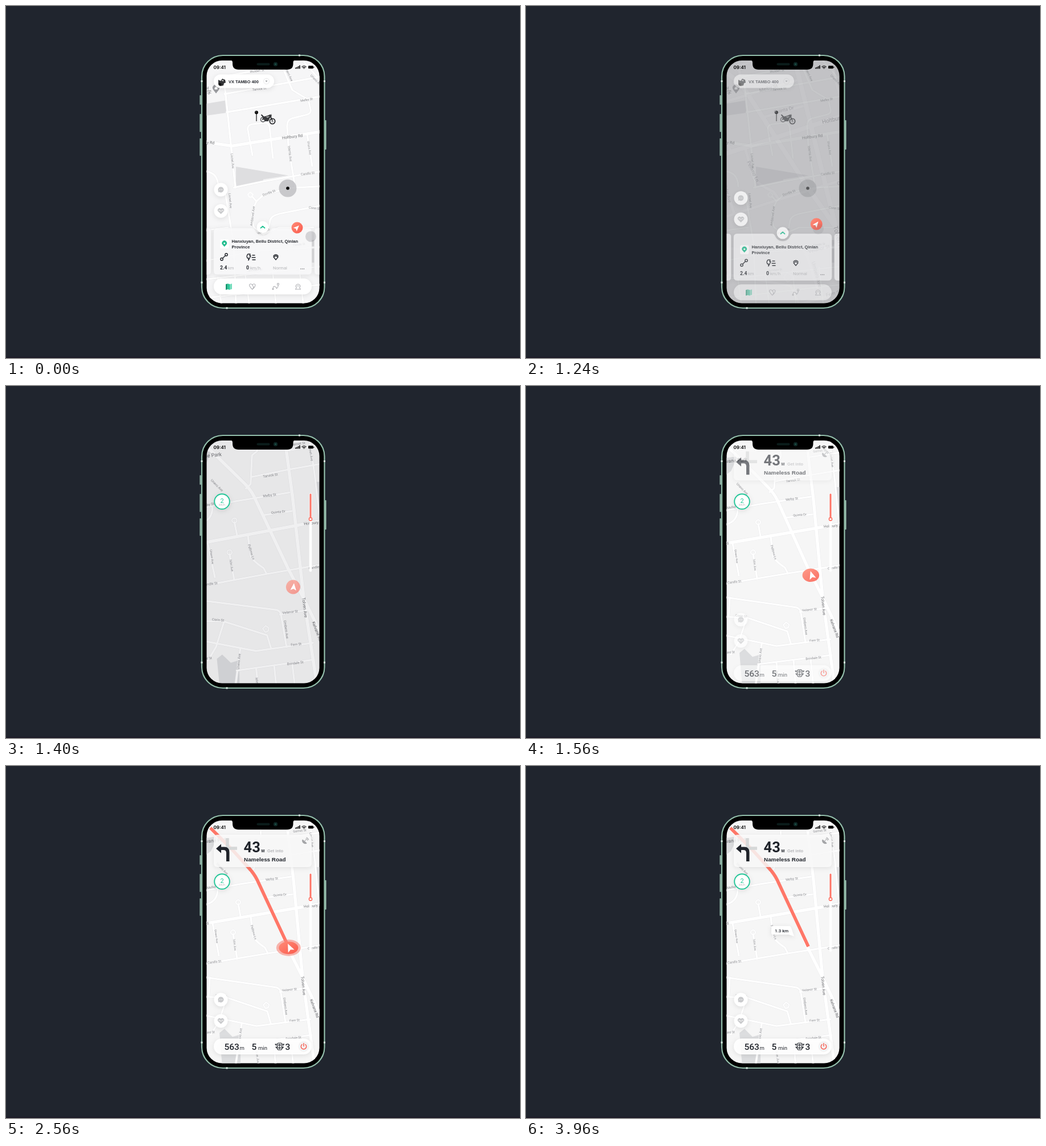
Recreate the animation shown at these times as an HTML page. Size 903 px wide and 620 px high, loop 4 s.

```html
<!DOCTYPE html>
<html lang="en">
<head>
<meta charset="utf-8">
<title>Ride navigation</title>
<style>
html, body { margin: 0; height: 100%; overflow: hidden; background: #20252e; }
svg { display: block; width: 100vw; height: 100vh; }
text { font-family: Roboto, Arial, sans-serif; }
.b { font-family: "Liberation Sans", Arial, sans-serif; font-weight: 700; }
.mid { text-anchor: middle; }
.grey { fill: #b5b6b9; }
.shade { filter: drop-shadow(0 2px 4px rgba(0,0,0,.1)); }
.line { fill: none; stroke-linecap: round; stroke-linejoin: round; }
</style>
</head>
<body>
<svg viewBox="0 0 903 620">
<defs>
  <clipPath id="screen"><rect x="352.5" y="96" width="198" height="427.5" rx="27"/></clipPath>
  <linearGradient id="red" x1="0" y1="0" x2="1" y2="1"><stop stop-color="#ff8c78"/><stop offset="1" stop-color="#fa5a4c"/></linearGradient>
  <g id="help">
    <g class="shade" fill="#fff"><circle cx="377.5" cy="323.5" r="12"/><circle cx="377.5" cy="361" r="12"/></g>
    <g fill="#c9cacc">
      <path d="M377.500 318.500a5 5 0 1 1-3 9l-2 .8.6-2.300a5 5 0 0 1 4.400-7.500z"/>
      <path d="M377.500 366.500l-5-5a3.200 3.200 0 0 1 5-4 3.200 3.200 0 0 1 5 4z"/>
    </g>
    <g fill="#fff"><circle cx="375.800" cy="323.500" r=".8"/><circle cx="379.200" cy="323.500" r=".8"/></g>
    <path class="line" d="M374 360h2l1.500 2 2-2h2" stroke="#fff"/>
  </g>
</defs>

<rect width="903" height="620" fill="#20252e"/>
<rect y="618" width="903" height="2" fill="#1c1a26"/>

<!-- phone body -->
<g class="line" stroke="#a8d3be" stroke-width="2">
  <path d="M341.500 158v15M341.500 191v30M341.500 234v29M561.500 202v50"/>
</g>
<rect x="344" y="87" width="215.500" height="445" rx="37" stroke="#93bfab" stroke-width="2.200"/>
<g fill="#dff3e9">
  <path d="M514 85.500h3v3h-3zM386.500 530.500h3v3h-3zM342.500 131h3v3h-3zM558 131h3v3h-3zM342.500 485.500h3v3h-3zM558 485.500h3v3h-3z"/>
</g>

<g clip-path="url(#screen)">
  <rect x="352" y="96" width="199" height="428" fill="#23272e"/>

  <g id="home">
    <rect x="352" y="96" width="199" height="428" fill="#f6f6f7"/>
    <path d="M352 172l36-6v22l-36 5zM404 283l92 15.500-44 7v5l-48 8zM537 412h4.500v40h-4.500z" fill="#dedee0"/>
    <g id="homeMap"></g>
    <path d="M425 332l4-4 5 4-3 5-4-1z" fill="#f6f6f7" stroke="#fff" stroke-width="1.500"/>
    <text x="345" y="147" font-size="8" fill="#77787b">ool</text>
    <text x="353" y="155" font-size="8" fill="#77787b" style="font-family:'Noto Sans CJK SC','Noto Sans CJK',sans-serif">学</text>
    <path d="M369 154l-5-6.500a6 6 0 1 1 10 0z" fill="#9b9ca0"/>
    <path d="M366.500 144l2.500-2 2.500 2v3h-5z" fill="#fff"/>
    <circle cx="495" cy="321" r="15.500" fill="#b9b9bc" opacity=".75"/>
    <circle cx="495" cy="321" r="2.800"/>
    <path d="M440 188v15" stroke="#111" stroke-width="1.200"/>
    <circle cx="440" cy="187.500" r="3"/><circle cx="439.200" cy="186.800" r=".9" fill="#777"/>
    <g class="line" stroke="#26272a" stroke-width="1.800">
      <circle cx="451.500" cy="200" r="4" stroke="#6d6e72"/><circle cx="468" cy="203" r="4.600"/>
      <path d="M449 192l4 4 6-2 7-2M464 193l4 9M453 196l-2 4"/>
    </g>
    <path d="M451 195l7-1 6-3 3 3-4 4-2 5h-6l-3-4z" fill="#37383b"/>
    <path d="M456 195l7-1-3 3zM464 191l3-1v2z" fill="#bbb"/>
    <circle cx="468" cy="203" r="1.800" fill="#8c8d90"/>
  </g>

  <g id="nav">
    <rect x="352" y="96" width="199" height="428" fill="#f6f6f6"/>
    <g id="navMap"></g>
  </g>
  <path id="route" class="line" pathLength="1" d="M496 318L441 200Q436 190 427 180L398 148L359 109" stroke="#ff7768" stroke-width="5.700" style="stroke-linecap:butt" stroke-dasharray="1 1.100"/>

  <g id="gauges">
    <path d="M535 191v134" class="line" stroke="#fff" stroke-width="4.500"/>
    <path d="M535 191v40" class="line" stroke="#ff7466" stroke-width="3"/>
    <circle cx="535" cy="234.500" r="2.600" fill="#fff" stroke="#ff7466" stroke-width="1.600"/>
    <circle class="shade" cx="379.500" cy="203.500" r="13.300" fill="#fff" stroke="#23c698" stroke-width="1.900"/>
    <text class="mid" x="379.500" y="205.500" font-size="11" fill="#23c698">2</text>
    <text class="mid grey" x="379.500" y="211" font-size="4.500">km/h</text>
  </g>

  <g id="bars">
    <g id="head">
      <rect class="shade" x="365" y="121" width="172" height="57" rx="6" fill="#fbfbfb" fill-opacity=".84"/>
      <path d="M389 127v25M389 145h17" stroke="#d6d8d8" stroke-width="5.500" fill="none"/>
      <path d="M369 145.500l9-8v5h5.500q9 0 9 9.500v16h-5.500v-15q0-5-5-5h-4v5.500z" fill="#20242b"/>
      <text x="417.500" y="152" font-size="25.500" font-weight="600" fill="#20242b">43</text>
      <text class="b" x="448.500" y="151.500" font-size="7" fill="#20242b">M</text>
      <text class="b grey" x="459" y="151.500" font-size="7.400">Get into</text>
      <text class="b" x="418" y="168" font-size="9.900" fill="#20242b">Nameless Road</text>
      <g class="line" stroke="#a3a4a7" stroke-width="1.100">
        <path d="M521 130a5 5 0 0 0 7 6z" fill="#a3a4a7"/><path d="M525 132l1.500-2M527 128a4 4 0 0 1 2.500 3M528 126a6 6 0 0 1 3.500 4"/>
      </g>
    </g>
    <use href="#help" y="88"/>
    <g id="foot" fill="#20242b">
      <rect class="shade" x="365" y="480" width="172" height="28" rx="14" fill="#fff" fill-opacity=".9"/>
      <text x="383.500" y="500" font-size="15.500" font-weight="500">563</text>
      <text x="410.500" y="500" font-size="9.500">m</text>
      <text x="431.500" y="500" font-size="15.500" font-weight="500">5</text>
      <text x="443" y="500" font-size="9.500">min</text>
      <text x="490.500" y="500" font-size="15.500" font-weight="500">3</text>
      <g class="line" stroke="#20242b" stroke-width="1.200">
        <rect x="477" y="488" width="7.500" height="12" rx="1.500"/><circle cx="480.700" cy="491.500" r="1.400"/><circle cx="480.700" cy="496.500" r="1.400"/>
        <path d="M476 490h-3l2 2M476 495h-2l2 2M485.500 490h3l-2 2M485.500 495h2l-2 2"/>
      </g>
      <circle cx="523" cy="494" r="9.500" fill="#f3f3f4"/>
      <path class="line" d="M520 490.500a4.700 4.700 0 1 0 6 0M523 488.500v5" stroke="#f8574b" stroke-width="1.400"/>
    </g>
  </g>

  <g id="pill">
    <rect class="shade" x="365" y="120.500" width="106" height="24" rx="12" fill="#fff"/>
    <path d="M373 130l4 2 3-4 5 2 1 5-3 1-1 4-5 1-4-3z" fill="#333437"/>
    <circle cx="376" cy="138" r="2.500" fill="#111"/><path d="M378 131l4-1v3z" fill="#ccc"/>
    <text class="b" x="391" y="135.500" font-size="7.400" fill="#22252b">VX TAMBO 400</text>
    <circle cx="457.500" cy="132.500" r="5" fill="#fff" stroke="#e2e2e4" stroke-width=".8"/>
    <path d="M455.500 131.500h4l-2 2.300z" fill="#88898d"/>
  </g>

  <g id="tools"><use href="#help"/></g>

  <g id="card">
    <g class="shade" fill="#fbfbfc" fill-opacity=".82" stroke="#ececee" stroke-width=".6">
      <path d="M365 397q0-6 6-6h61c5 0 5 4 8 8q4 5 11 5t11-5c3-4 3-8 8-8h61q6 0 6 6v70q0 6-6 6h-160q-6 0-6-6z"/>
      <path d="M345 391h10q5 0 5 5v72q0 5-5 5h-10zM558 391h-11q-5 0-5 5v72q0 5 5 5h11z"/>
    </g>
    <circle class="shade" cx="451" cy="389.500" r="10.500" fill="#fff"/>
    <path class="line" d="M447.500 391l3.500-3 3.500 3" stroke="#22c394" stroke-width="1.800"/>
    <rect x="376" y="411" width="15.500" height="16" rx="3" fill="#fff"/>
    <path d="M383.700 424l-3.200-3.500a4.300 4.300 0 1 1 6.400 0z" fill="#22bd8f"/><circle cx="383.700" cy="418" r="1.500" fill="#fff"/>
    <g class="b" fill="#25282e" font-size="7.550">
      <text class="b" x="396.500" y="417">Hanxiuyan, Beilu District, Qinlan</text><text class="b" x="396.500" y="426.500">Province</text>
    </g>
    <g class="line" stroke="#25282e" stroke-width="1.400">
      <circle cx="379" cy="446" r="2.200"/><circle cx="387" cy="438" r="2.200"/><path d="M381 444l4-4"/>
      <path d="M425 437h4l-1 3h2l-4 8v-4h-2q-2-4 1-7zM433 439h4M432 443h6M433 447h5M470 440q4-4 8 0M474 447l-4-5 4-2 4 2z"/>
    </g>
    <g font-size="8.600" font-weight="700" fill="#25282e"><text x="376" y="464">2.4</text><text x="422" y="464">0</text></g>
    <g class="grey" font-size="7.600"><text x="390" y="464">km</text><text x="429" y="464">km/h</text><text x="469" y="464">Normal</text></g>
    <g fill="#66676b"><circle cx="518" cy="463" r=".8"/><circle cx="520.700" cy="463" r=".8"/><circle cx="523.400" cy="463" r=".8"/></g>
  </g>

  <g id="tabs">
    <rect class="shade" x="365" y="480" width="172" height="28" rx="14" fill="#fff"/>
    <path d="M386 490l3.500-1v10l-3.500 1z" fill="#159a72"/><path d="M389.500 489l4 1v10l-4-1z" fill="#26c797"/><path d="M393.500 490l3.500-1v9.500l-3.500 1z" fill="#74dcbc"/>
    <g class="line" stroke="#b0b1b5" stroke-width="1.100">
      <path d="M432.500 499q-5-5-5-8 2-3 5 0l2.500 4q-1 4-2.500 4zM432.500 499q5-3 5.500-8-2-3-5 0"/>
      <path d="M469 499q0-6 3-5t3 3 3-3v-2"/><circle cx="478" cy="490" r="1.600"/><circle cx="469" cy="498.500" r="1"/>
      <path d="M509 494a4 4 0 1 1 8 0l-1.500 2 2 3h-9l2-3zM511 493h4"/>
    </g>
  </g>

  <g id="marker">
    <ellipse id="halo" fill="#f7887c" opacity=".6"/>
    <ellipse id="disc" fill="url(#red)"/>
    <path id="plane" d="M0-6.500L5 5.500 0 3-5 5.500z" fill="#fff"/>
  </g>
  <circle id="touch" fill="#77787d"/>

  <g id="bubble">
    <path class="shade" d="M434 282h28q3 0 4 3l5 15-9-3h-28q-3 0-3-3v-9q0-3 3-3z" fill="#fff"/>
    <text x="437" y="292.500" font-size="7.900" font-weight="500" fill="#20242b">1.3 km</text>
  </g>
</g>

<!-- notch and status bar -->
<path d="M394 95.500q4 0 4 4v2q0 10.500 10.500 10.500h85.500q10.500 0 10.500-10.500v-2q0-4 4-4z"/>
<rect x="440.500" y="100.500" width="23" height="4" rx="2" fill="#0b1c1b"/>
<circle cx="473.500" cy="102.500" r="3.800" fill="#0d2422"/><circle cx="473.500" cy="102.500" r="1.500" fill="#1d5046"/>
<text class="b" x="364.500" y="111" font-size="8" style="font-weight:600;font-family:Inter,Arial,sans-serif">09:41</text>
<path d="M508 108.500h1.600v2h-1.600zM510.400 107.500h1.600v3h-1.600zM512.800 106h1.600v4.500h-1.600zM515.200 104.500h1.600v6h-1.600z"/>
<path class="line" d="M520 107q3.500-3 7 0M521.500 108.700q2-1.600 4 0" stroke="#000" stroke-width="1.200"/><circle cx="523.500" cy="110" r=".8"/>
<rect x="531" y="105.300" width="9" height="5" rx="1.300"/><path d="M541 107v1.800" stroke="#000"/>
</svg>

<script>
const $ = id => document.getElementById(id);

function add(parent, tag, attrs, text = '') {
  const el = document.createElementNS('http://www.w3.org/2000/svg', tag);
  for (const name in attrs) el.setAttribute(name, attrs[name]);
  el.textContent = text;
  parent.append(el);
}

// Roads are [width, path], labels are [text, x, y, angle, size].
function drawMap(id, roads, labels) {
  for (const [extra, stroke] of [[.9, '#e8e8ea'], [0, '#fff']])
    for (const [w, d] of roads)
      add($(id), 'path', { d, stroke, 'stroke-width': w + extra, class: 'line' });
  for (const [text, x, y, angle, size = 5.7] of labels)
    add($(id), 'text', {
      class: 'mid', dy: '.35em', 'font-size': size, fill: size > 6.4 ? '#68696d' : '#8b8c90',
      transform: `translate(${x} ${y}) rotate(${angle})`
    }, text);
}

drawMap('homeMap', [
  [5.5, 'M345 239L397 246.500L560 220'],
  [3.5, 'M388 187L560 158M384 155L550 125M378 125L470 108'],
  [3.5, 'M383 130L390 195L403 320M385 328L400 420L404 523'],
  [3.2, 'M433 263L425 219Q423 209 434 208L454 206Q461 205 463 213L469 268'],
  [3.2, 'M478 90L503 148L531 165L535 182Q537 190 526 192L502 198Q493 201 494 214L496 245L508 320'],
  [3.2, 'M520 95L555 134M529 226L538 282M400 320L452 309L560 290'],
  [3.2, 'M431 334L440 344L452 333L495 321L560 317M440 344Q427 370 436 390L452 402'],
  [3.2, 'M461 395L464 377Q466 370 480 366L500 362L560 350M452 402L480 390L540 390'],
  [3.2, 'M345 291Q372 290 373 318M345 396L390 390M345 450L435 432L560 424'],
  [3, 'M345 482L560 458M345 515L560 490M372 478L378 523M420 470L427 523M468 464L474 523M515 460L522 523']
], [
  ['Wolden St', 441, 114, -7], ['Tarvick St', 445, 146, -7], ['Melby St', 528, 165, -9],
  ['Holtbury Rd', 503, 230, -7, 7], ['Holtbury Rd', 348, 239.5, 5, 7], ['Unavo Ave', 497, 120, 65],
  ['Unavo Ave', 545, 131, 46], ['Islenta Ave', 499, 260, 83], ['Unavo Ave', 533, 250, 82, 5.2],
  ['Candle St', 530, 295, -7], ['Linnet Ave', 398, 273, 84], ['Linnet Ave', 394, 343, 84],
  ['Dovilla St', 462, 329, -20], ['Ambervel Ave', 433, 370, -83], ['Corin St', 542, 356, 8],
  ['Velanor St', 452, 397, -20, 5], ['Candle St', 515, 420, -6, 5], ['Brindale St', 438, 465, -6, 5]
]);

add($('navMap'), 'path', { d: 'M375 470L384 463L398 477L412 473V530H380ZM340 128L372 124L360 150L340 165ZM542 178h20v70h-10z', fill: '#dcdddf' });
drawMap('navMap', [
  [5.5, 'M335 88L380 132L427 180Q436 190 441 200L495 320L519 368L560 455'],
  [5.5, 'M492 90L505 200L521 372L543 535M335 280L500 252L570 240'],
  [3.2, 'M335 222L411 208L500 195M456 232L503 226M438 168L498 157L560 147M446 90L448 125L439 132L436 180L428 187'],
  [3.2, 'M345 245Q372 242 372 216M408 243L412 265M363 277L374 334M399 296L406 339'],
  [3.2, 'M430 266L434 299Q436 307 455 320L460 330M335 351L460 330L570 313'],
  [3.2, 'M335 370L475 390Q482 392 483 400L491 452M481 398L528 391M358 372L356 405'],
  [3.2, 'M335 406L388 408L459 432L465 453M335 436L440 458L535 446M388 408L374 450L360 473'],
  [3.2, 'M414 455L404 523M408 490L536 474M440 487L444 530M470 483L474 530M500 480L505 530'],
  [3, 'M533 90L543 170L550 245M500 125L560 116'],
  [2, 'M404 240a4 4 0 1 0 8 0a4 4 0 1 0-8 0M395 293a4 4 0 1 0 8 0a4 4 0 1 0-8 0M452 421l5-5 5 4-1 5-5 2z']
], [
  ['Kelvane Park', 364, 131.5, -5, 8.6], ['Garnet St', 516, 114, -6], ['Linnet Ave', 537, 130, 82],
  ['Tarvick St', 469, 166, -8], ['Unavo Ave', 380, 181, 46], ['Melby St', 467, 199, -7],
  ['Melby St', 364, 213, -9], ['Quinta Dr', 481, 227, -5], ['Holtbury Rd', 540, 246, -5, 6.5],
  ['Holtbury Rd', 339, 279, -8, 6.5], ['Unavo Ave', 369.5, 300, 83, 5.2], ['Ister Ave', 402, 315, 83, 5.2],
  ['Pellimo Ln', 435, 293, 74], ['Candle St', 366, 345, -7], ['Candle St', 542, 320, -7],
  ['Tolven Ave', 522.5, 387, 84, 7], ['Kelvane Rd', 542, 427, 70, 7], ['Velanor St', 498, 394, -6],
  ['Corin St', 378, 405, 6], ['Umbero Ave', 491, 423, 83], ['Fern St', 507, 448, -5],
  ['Brindale St', 505, 479, -6], ['Flint St', 358, 469, -5], ['Unavo Ave', 411, 475, -83], ['Ister Ave', 442, 513, 83]
]);

const ramp = (t, a, b) => Math.min(1, Math.max(0, (t - a) / (b - a)));
const ease = x => x * x * (3 - 2 * x);
const mix = (a, b, x) => a + (b - a) * x;

// Piecewise value from [time, value] stops.
function key(t, ...stops) {
  let i = 1;
  while (i < stops.length - 1 && t > stops[i][0]) i++;
  const [[t0, v0], [t1, v1]] = [stops[i - 1], stops[i]];
  return mix(v0, v1, ramp(t, t0, t1));
}

const fade = (id, opacity) => {
  $(id).style.opacity = opacity;
  $(id).style.display = opacity > 0 ? '' : 'none';
};
const place = (id, x, y, more = '') => $(id).setAttribute('transform', `translate(${x} ${y}) ${more}`);
const oval = (id, rx, ry) => { $(id).setAttribute('rx', rx); $(id).setAttribute('ry', ry); };

function draw(t) {
  const go = key(t, [1160, 0], [1240, .1], [1320, .3], [1400, .57], [1480, .78], [1600, .95], [1720, 1]);
  const zoom = key(t, [1160, 1.8], [1320, 1], [1400, .16], [1480, 0]);
  const enter = ease(ramp(t, 1400, 1680));
  const ride = ease(ramp(t, 2290, 2810));

  fade('home', key(t, [1160, 1], [1320, .3], [1400, 0]));
  fade('nav', key(t, [1160, 0], [1320, .6], [1400, .935], [1480, 1]));
  place('navMap', 494.5 - 5 * zoom, 293 - 10.5 * zoom, `rotate(${-6 * zoom}) scale(${1 + .36 * zoom}) translate(-494.5 -293)`);

  const leave = key(t, [1160, 1], [1320, .5], [1395, 0]);
  fade('card', leave);
  fade('tools', leave);
  place('card', 0, go * 103);
  place('tools', 0, go * 147);
  fade('pill', 1 - ramp(t, 1170, 1300));
  fade('tabs', 1 - ramp(t, 1170, 1300));
  place('tabs', 0, go * 103);

  fade('gauges', ramp(t, 1325, 1395));
  fade('bars', enter);
  place('head', 0, -30 * (1 - enter));
  place('foot', 0, 30 * (1 - enter));

  const grow = 1 - (1 - ramp(t, 1740, 2240)) ** 3.5;
  fade('route', grow);
  $('route').setAttribute('stroke-dashoffset', 1 - grow);

  place('marker', mix(511.5, 499, go) - 5 * ride, mix(390.5, 326.5, go) - 12 * ride);
  fade('marker', t < 3960 ? 1 : 0);
  const halo = ease(ramp(t, 1560, 1880));
  oval('halo', 21.5 * halo, 14.5 * halo);
  oval('disc', key(t, [1160, 10], [1320, 11], [1400, 12.5], [1720, 17]), key(t, [1160, 10], [1320, 11], [1400, 12.5], [1720, 11]));
  fade('disc', key(t, [1160, 1], [1320, .88], [1400, .58], [1640, 1]));
  place('plane', mix(-.5, 2, go), 0, `rotate(${45 - 70 * go}) scale(${mix(.85, 1.2, go)})`);

  const move = ease(ramp(t, 20, 570));
  const press = ease(ramp(t, 580, 1080));
  place('touch', mix(535.5, 515.5, move) - 2 * press, mix(406, 393.8, move) - 1.3 * press);
  $('touch').setAttribute('r', 9.5);
  fade('touch', (.27 + .2 * press) * (1 - ramp(t, 1160, 1280)));

  fade('bubble', ramp(t, 3020, 3240));
}

let start;
function frame(now) {
  start ??= now;
  draw((now - start) % 4000);
  requestAnimationFrame(frame);
}
draw(0);
requestAnimationFrame(frame);
</script>
</body>
</html>
```
